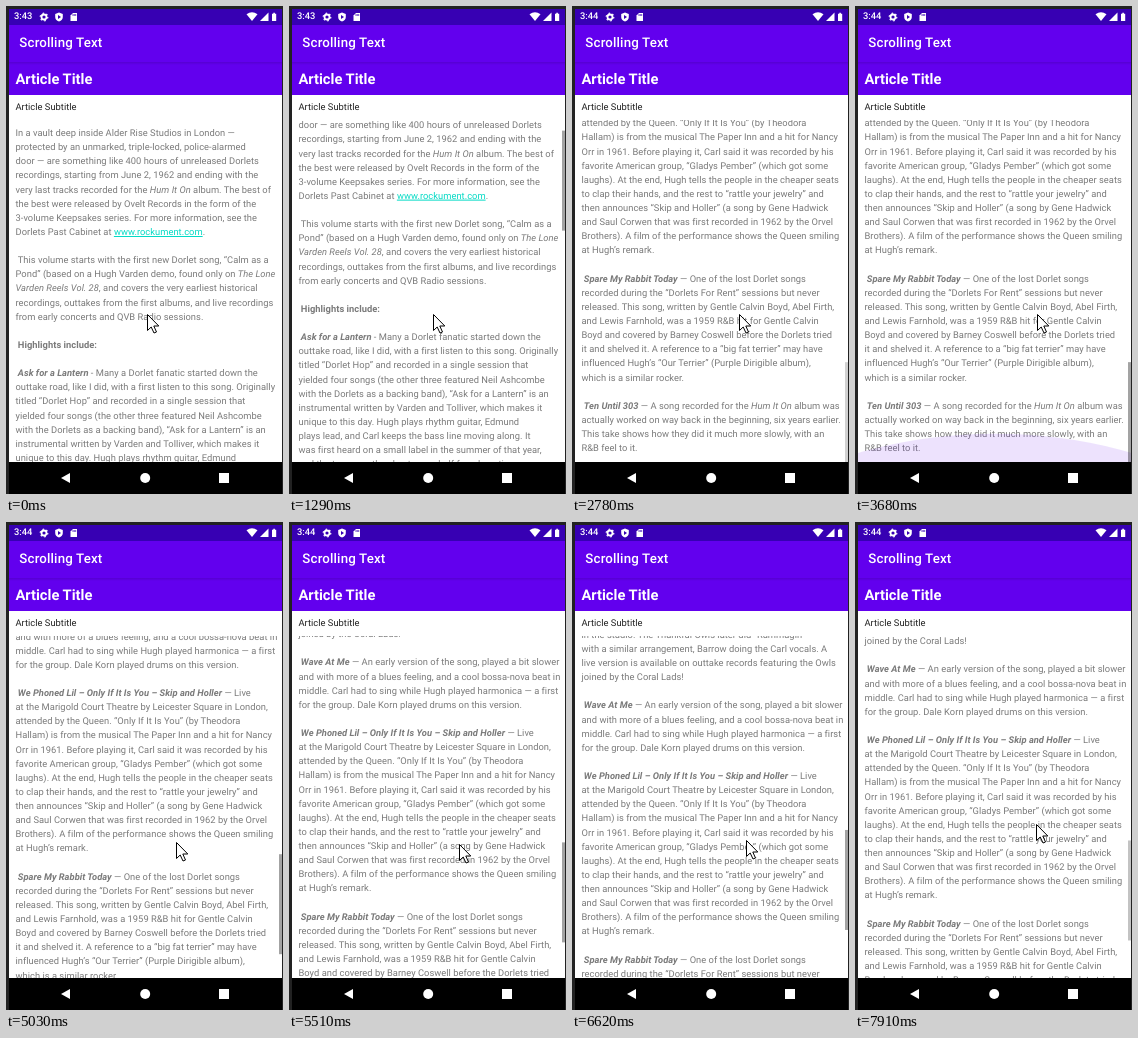
An HTML page for the animation above (8 s loop, 277 px wide and 488 px high).

```html
<!DOCTYPE html>
<html lang="en">
<head>
<meta charset="utf-8">
<title>Scrolling Text</title>
<style>
  html, body { margin: 0; width: 100%; height: 100%; overflow: hidden; background: #222; }
  #stage {
    position: absolute; left: 0; top: 0; width: 277px; height: 488px; overflow: hidden;
    font: 9.33px Roboto, sans-serif; text-rendering: geometricPrecision;
  }
  #stage > *, #view > * { position: absolute; }
  .band { left: 3px; width: 273px; }
  .line { white-space: pre; transform: translateY(-50%); line-height: 1; color: #fff; }
  #status { top: 3px; height: 16px; background: #3700b3; }
  #head { top: 19px; height: 70px; background: #6200ee; }
  #shade { top: 56px; height: 3px; background: linear-gradient(rgba(0,0,0,.12), transparent); }
  #page { top: 89px; height: 367px; background: #fff; }
  #nav { top: 456px; height: 32px; background: #000; }
  #clock { left: 8px; top: 11.3px; font-weight: 500; }
  #app { left: 13.3px; top: 38.4px; font-weight: 500; font-size: 13.3px; letter-spacing: .0125em; }
  #title { left: 9.4px; top: 73px; font-weight: 700; font-size: 14.7px; }
  #sub { left: 9.4px; top: 102.3px; color: #212121; letter-spacing: .03px; }
  #view { top: 114px; height: 342px; overflow: hidden; }
  #text {
    left: 6.5px; top: 7px; margin: 0; white-space: pre; color: #7a7a7a;
    font: inherit; line-height: 14.13px; letter-spacing: .03px;
  }
  #text a { color: #03dac5; text-decoration: underline; }
  /* A wide circle, squashed against the lower edge of the view */
  #glow {
    left: -190.5px; top: 298px; width: 654px; height: 654px; border-radius: 50%;
    background: #6200ee; transform-origin: 50% 44px;
  }
  #bar { right: 0; top: 0; width: 3px; background: rgba(0,0,0,.36); }
  svg { left: 0; top: 0; }
</style>
</head>
<body>
<div id="stage">
  <div id="status" class="band"></div>
  <div id="head" class="band"></div>
  <div id="shade" class="band"></div>
  <div id="page" class="band"></div>
  <div id="clock" class="line">3:43</div>
  <div id="app" class="line">Scrolling Text</div>
  <div id="title" class="line">Article Title</div>
  <div id="sub" class="line">Article Subtitle</div>
  <div id="view" class="band">
<pre id="text">
In a vault deep inside Alder Rise Studios in London —
protected by an unmarked, triple-locked, police-alarmed
door — are something like 400 hours of unreleased Dorlets
recordings, starting from June 2, 1962 and ending with the
very last tracks recorded for the <i>Hum It On</i> album. The best of
the best were released by Ovelt Records in the form of the
3-volume Keepsakes series. For more information, see the
Dorlets Past Cabinet at <a>www.rockument.com</a>.

 This volume starts with the first new Dorlet song, “Calm as a
Pond” (based on a Hugh Varden demo, found only on <i>The Lone</i>
<i>Varden Reels Vol. 28</i>, and covers the very earliest historical
recordings, outtakes from the first albums, and live recordings
from early concerts and QVB Radio sessions.

 <b>Highlights include:</b>

 <b><i>Ask for a Lantern</i></b> - Many a Dorlet fanatic started down the
outtake road, like I did, with a first listen to this song. Originally
titled “Dorlet Hop” and recorded in a single session that
yielded four songs (the other three featured Neil Ashcombe
with the Dorlets as a backing band), “Ask for a Lantern” is an
instrumental written by Varden and Tolliver, which makes it
unique to this day. Hugh plays rhythm guitar, Edmund
plays lead, and Carl keeps the bass line moving along. It
was first heard on a small label in the summer of that year,
and the tape was then kept on a shelf for a long time.

 <b><i>My Corner Window</i></b> — A slow ballad taped at home, with
only a guitar and one voice. The sound is rough, but the
tune is already there, and it shows how they worked on
a song before taking it to the studio. The words were
changed twice before the group settled on the last verse.

 <b><i>Pass the Teapot</i></b> — An early take with a faster beat and
a shorter ending. Listen for the laughter near the close,
when somebody drops a tambourine. The next take was
the one that was used for the single, with a new ending
and a second guitar.

 <b><i>Rummagin’</i></b> — A comedy number from the stage show,
recorded at the first audition for a record company. The
group played fifteen songs in about an hour that day, and
was turned down a few weeks later. Carl sings the lead
and the others answer him. The song was a favorite of
the crowds in the clubs, but it was never done properly
in the studio. The Thankful Owls later did “Rummagin’”
with a similar arrangement, Barrow doing the Carl vocals. A
live version is available on outtake records featuring the Owls
joined by the Coral Lads!

 <b><i>Wave At Me</i></b> — An early version of the song, played a bit slower
and with more of a blues feeling, and a cool bossa-nova beat in
middle. Carl had to sing while Hugh played harmonica — a first
for the group. Dale Korn played drums on this version.

 <b><i>We Phoned Lil – Only If It Is You – Skip and Holler</i></b> — Live
at the Marigold Court Theatre by Leicester Square in London,
attended by the Queen. “Only If It Is You” (by Theodora
Hallam) is from the musical The Paper Inn and a hit for Nancy
Orr in 1961. Before playing it, Carl said it was recorded by his
favorite American group, “Gladys Pember” (which got some
laughs). At the end, Hugh tells the people in the cheaper seats
to clap their hands, and the rest to “rattle your jewelry” and
then announces “Skip and Holler” (a song by Gene Hadwick
and Saul Corwen that was first recorded in 1962 by the Orvel
Brothers). A film of the performance shows the Queen smiling
at Hugh’s remark.

 <b><i>Spare My Rabbit Today</i></b> — One of the lost Dorlet songs
recorded during the “Dorlets For Rent” sessions but never
released. This song, written by Gentle Calvin Boyd, Abel Firth,
and Lewis Farnhold, was a 1959 R&amp;B hit for Gentle Calvin
Boyd and covered by Barney Coswell before the Dorlets tried
it and shelved it. A reference to a “big fat terrier” may have
influenced Hugh’s “Our Terrier” (Purple Dirigible album),
which is a similar rocker.

 <b><i>Ten Until 303</i></b> — A song recorded for the <i>Hum It On</i> album was
actually worked on way back in the beginning, six years earlier.
This take shows how they did it much more slowly, with an
R&amp;B feel to it.
</pre>
    <div id="glow"></div>
    <div id="bar"></div>
  </div>
  <div id="nav" class="band"></div>
  <svg width="277" height="488" fill="#fff">
    <g fill="none" stroke="#fff">
      <circle cx="38" cy="11" r="2.5" stroke-width="1.8"/>
      <circle cx="38" cy="11" r="3.8" stroke-width="1.2" stroke-dasharray="1.6 2.38"/>
    </g>
    <path d="M53 6.6l3.8 1.5v2.8q0 3-3.8 4.7q-3.8-1.7-3.8-4.7v-2.8z"/>
    <path d="M52 9l3 2-3 2z" fill="#3700b3"/>
    <path d="M67 7h4v8h-6.5v-5.5z"/>
    <path d="M67 8v2M68.3 8v2M69.7 8v2" stroke="#3700b3" stroke-width=".7"/>
    <path d="M240.5 8.2q5.5-4 11 0l-5.5 6.8z"/>
    <path d="M262.5 6.5V15H254z"/>
    <path d="M266 7.7h1.3v-.9h1.6v.9h1.3V15H266z"/>
    <path d="M55 472l9-5v10z"/>
    <circle cx="139.2" cy="472" r="5"/>
    <rect x="213" y="467" width="10" height="10"/>
    <path id="cursor" d="M.5.5v16l3.7-3.5 2.8 6 2.5-1-2.7-6h5z" stroke="#000"/>
  </svg>
</div>
<script>
  const LOOP = 8000, VIEW = 342, PADDING = 13;
  const [text, bar, glow, cursor, clock] =
    ["text", "bar", "glow", "cursor", "clock"].map(id => document.getElementById(id));
  const total = text.getBoundingClientRect().height + PADDING;
  const max = total - VIEW;
  bar.style.height = `${VIEW * VIEW / total}px`;

  // Smooth rise from 0 to 1 between two times
  function ramp(t, from, to) {
    const p = Math.min(1, Math.max(0, (t - from) / (to - from)));
    return p * p * (3 - 2 * p);
  }
  const puff = (t, from, peak, to) => ramp(t, from, peak) - ramp(t, peak, to);

  // Distance left to the end of the article
  function remaining(t) {
    const fling = max * (1 - ramp(t, 1200, 1920));
    const nudge = 70 * (ramp(t, 2940, 3180) - ramp(t, 3580, 3680));
    const back = 65 * (ramp(t, 3970, 4330) + ramp(t, 4820, 5450)) - 130 * ramp(t, 5470, 5750);
    const last = 165 * ramp(t, 6380, 6620) + 50 * ramp(t, 6620, 7010) - 86 * ramp(t, 7280, 7530);
    return fling + nudge + back + last;
  }

  function pointer(t) {
    const right = ramp(t, 2420, 3060), down = ramp(t, 3940, 4760);
    const settle = ramp(t, 6000, 6620), leave = ramp(t, 7130, 7910);
    const x = 141 + 5 * ramp(t, 0, 2300) + 36 * right - 12 * down + 4 * settle + 7 * leave;
    const y = 308 + 12 * down + 3 * ramp(t, 5030, 5990) - 5 * settle - 16 * leave;
    return [Math.round(x), Math.round(y)];
  }

  function draw(t) {
    const top = max - remaining(t);
    text.style.transform = `translateY(${-top}px)`;
    bar.style.transform = `translateY(${top * VIEW / total}px)`;
    bar.style.opacity = ramp(t, 1170, 1290) - .35 * ramp(t, 7670, 7910)
      - .5 * (puff(t, 2540, 2780, 3060) + puff(t, 4560, 4760, 4910));

    const pull = .6 * puff(t, 1800, 1920, 2420) + .64 * puff(t, 3580, 3680, 3940)
      + .57 * puff(t, 5690, 5840, 6350);
    glow.style.transform = `scaleY(${pull})`;
    glow.style.opacity = Math.min(.12, pull * .18);

    cursor.setAttribute("transform", `translate(${pointer(t)})`);
    clock.textContent = t < 2060 ? "3:43" : "3:44";
  }

  function tick() {
    draw(performance.now() % LOOP);
    requestAnimationFrame(tick);
  }
  tick();
</script>
</body>
</html>
```
